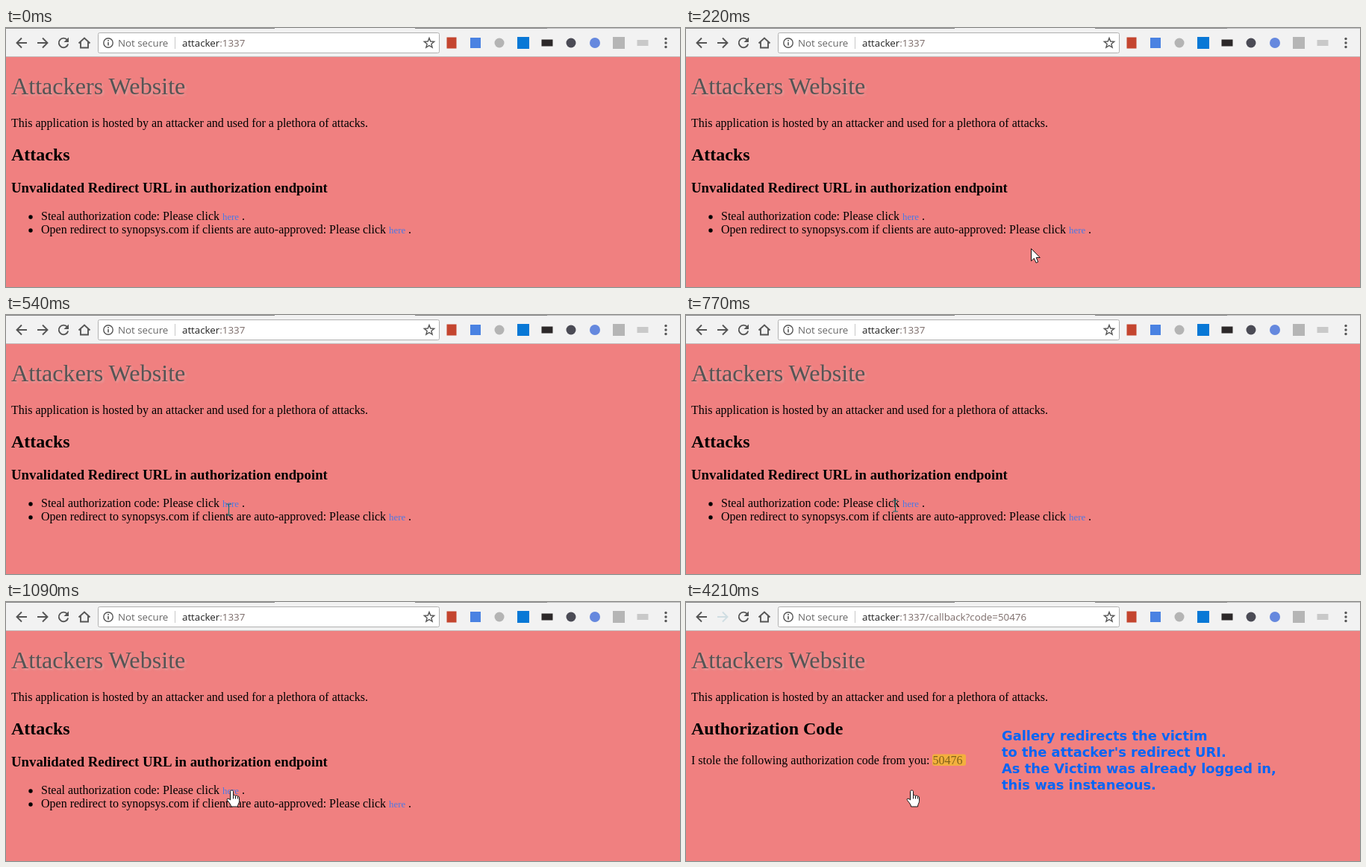
An HTML page for the animation above (5870 ms loop, 903 by 348 pixels).

```html
<!DOCTYPE html>
<html lang="en">
<head>
<meta charset="utf-8">
<title>Redirect demo</title>
<style>
  html, body { margin: 0; width: 100%; height: 100%; overflow: hidden; }
  svg { display: block; width: 903px; height: 348px; }
  .page { font: 16px "Liberation Serif", "Times New Roman", serif; fill: #000; }
  .title { font-size: 32.15px; fill: #555; filter: drop-shadow(2px 2px 1.5px rgba(215, 190, 190, .5)); }
  .h2 { font-size: 24px; font-weight: bold; }
  .h3 { font-size: 18.79px; font-weight: bold; }
  .link { font-size: 12.8px; fill: #4a78e6; }
  .ui { font: 13.34px "Open Sans", "Noto Sans", sans-serif; }
  .status { font-size: 11.5px; fill: #4c4c4c; }
  .note { font: bold 17.86px "DejaVu Sans", Verdana, sans-serif; fill: #0565f5; }
  .icon { fill: none; stroke: #555; stroke-width: 1.9; }
  .marker { fill: #fae02a; opacity: .6; }
</style>
</head>
<body>
<svg viewBox="0 0 903 348">
  <rect width="903" height="348" fill="#f08080"/>

  <g id="toolbar">
    <rect width="903" height="38" fill="#f2f2f2"/>
    <rect y="38" width="903" height="1" fill="#c4bcbc"/>
    <path d="M0 .5H360M548 .5H725" stroke="#888"/>
    <path d="M725 .5H903" stroke="#bbb"/>
    <rect x="123.5" y="6.5" width="457" height="27" rx="2" fill="#fff" stroke="#b0b0b0"/>
    <path class="icon" d="M28 20H15M21 13.5L14.5 20L21 26.5"/>
    <path id="forward" class="icon" d="M42 20H55M49 13.5L55.5 20L49 26.5"/>
    <path class="icon" d="M82 16A6.3 6.3 0 1 0 83.2 21.5"/>
    <path d="M84 12.5V19H77.5Z" fill="#555"/>
    <path class="icon" d="M97.5 20.5L105 13.5L112.5 20.5M100 19V26.5H110V19"/>
    <circle class="icon" cx="137" cy="20" r="6.2" style="stroke-width:1.4"/>
    <path d="M137 16V17.7M137 19V23.5" stroke="#555" stroke-width="1.6"/>
    <path d="M226.5 12V28" stroke="#c8c8c8"/>
    <path id="star" class="icon" style="stroke-width:1.4"/>
    <g fill="#555"><circle cx="884" cy="14.5" r="1.7"/><circle cx="884" cy="20" r="1.7"/><circle cx="884" cy="25.5" r="1.7"/></g>
    <g id="extensions"></g>
    <g class="ui">
      <text x="150" y="25" fill="#666">Not secure</text>
      <text x="236" y="25" fill="#222">attacker<tspan id="path" fill="#7c6c6a"></tspan></text>
    </g>
  </g>

  <g class="page">
    <text class="title" x="7" y="89">Attackers Website</text>
    <text x="7" y="133">This application is hosted by an attacker and used for a plethora of attacks.</text>
    <g id="attacks">
      <text class="h2" x="7" y="178">Attacks</text>
      <text class="h3" x="7" y="221">Unvalidated Redirect URL in authorization endpoint</text>
      <circle cx="33" cy="254" r="2.7"/>
      <circle cx="33" cy="272" r="2.7"/>
      <text x="47" y="258">Steal authorization code: Please click <tspan class="link">here</tspan> .</text>
      <text x="47" y="276">Open redirect to synopsys.com if clients are auto-approved: Please click <tspan class="link">here</tspan> .</text>
    </g>
    <g id="stolen">
      <text class="h2" x="7" y="178">Authorization Code</text>
      <rect x="330" y="204.5" width="45" height="15.5" rx="3" fill="#f3b03e"/>
      <text x="7" y="218">I stole the following authorization code from you: <tspan fill="#80601a">50476</tspan></text>
    </g>
  </g>

  <g id="hover">
    <path d="M0 328.5H789Q792.5 328.5 792.5 332V348H0Z" fill="#eee7e7" stroke="#c0a6a6"/>
    <text class="ui status" x="2" y="343">gallery:3005/oauth/authorize?response_type=code&amp;redirect_uri=http%3A%2F%2Fattacker%3A1337%2Fcallback&amp;scope=email&amp;client_id=photoprint</text>
    <path class="marker" d="M285 331Q287 327 300 327L345 325Q380 323 418 325L420 328H590Q600 329 600 335V341Q598 345 588 344L440 343L410 346L330 345L294 346Q285 345 285 339Z"/>
  </g>
  <g id="linkNote" class="note"></g>
  <g id="codeNote" class="note"></g>

  <g id="cursor">
    <path id="arrow" d="M0 0V16.5L3.9 13L6.5 19L9.2 17.8L6.7 12H11.8Z" fill="#fff" stroke="#111"/>
    <path id="beam" d="M-3.5 -7.5H-1Q0 -7.5 0 -6.5Q0 -7.5 1 -7.5H3.5M0 -6.5V6.5M-3.5 7.5H-1Q0 7.5 0 6.5Q0 7.5 1 7.5H3.5" fill="none" stroke="#0f6f6f" stroke-width="1.1"/>
    <g id="hand" stroke="#111" stroke-linejoin="round">
      <path d="M-2 2C-2 0 2 0 2 2V8C2 6.7 5 6.9 5 8.2C5.2 7.2 8 7.3 8 9C8.4 8.2 10 8.6 10 10.5V15C10 18 8 19 8 22.5H-1C-1 20 -3.5 17 -6 14C-7.5 11.5 -4.5 10.5 -2 13.5Z" fill="#fff"/>
      <path d="M2 8V12M5 8.2V12M8 9V12"/>
    </g>
  </g>
</svg>
<script>
const LOOP = 5870, HOVER = 1240, STOLEN = 4210;
const $ = id => document.getElementById(id);
const show = (id, on) => $(id).setAttribute("visibility", on ? "inherit" : "hidden");

function add(parent, tag, attrs, text = "") {
  const node = document.createElementNS("http://www.w3.org/2000/svg", tag);
  for (const key in attrs) node.setAttribute(key, attrs[key]);
  node.textContent = text;
  parent.append(node);
}

const addNote = (id, x, y, lines) =>
  lines.forEach((line, i) => add($(id), "text", { x, y: y + 22 * i }, line));

addNote("linkNote", 567, 231, [
  "Attacker provides a link with", "custom redirect URI.",
  "The other parameters are still", "the same."
]);
addNote("codeNote", 423, 186, [
  "Gallery redirects the victim", "to the attacker's redirect URI.",
  "As the Victim was already logged in,", "this was instaneous."
]);

const starPoint = (_, i) => {
  const angle = i * Math.PI / 5, r = i % 2 ? 3 : 7;
  return [567 + r * Math.sin(angle), 20.5 - r * Math.cos(angle)];
};
$("star").setAttribute("d", "M" + Array.from({ length: 10 }, starPoint).join("L") + "Z");

// Toolbar buttons: colour, width, height (no height means a circle)
[
  ["#c4452f", 13, 15], ["#4a82e2", 14, 14], ["#b4b4b4", 13], ["#0878d6", 16, 16],
  ["#2c2829", 15, 9], ["#4b4b55", 13], ["#6588de", 14], ["#b5b5b5", 16, 16], ["#c9c9c9", 15, 8]
].forEach(([fill, width, height], i) => {
  const cx = 597 + 32 * i, cy = 20;
  if (height) add($("extensions"), "rect", { x: cx - width / 2, y: cy - height / 2, width, height, fill });
  else add($("extensions"), "circle", { cx, cy, r: width / 2, fill });
});

// Pointer stops: time, shape, x, y
const stops = [
  [70, "arrow", 707, 332], [150, "arrow", 580, 313], [220, "arrow", 462.5, 296.5],
  [310, "arrow", 408, 284], [390, "beam", 365.5, 273.5], [460, "beam", 328.5, 266.5],
  [540, "beam", 298.5, 261.5], [630, "beam", 280.5, 258.5], [710, "beam", 279.5, 257.5],
  [770, "beam", 280.5, 256.5], [860, "beam", 284.5, 255.5], [930, "hand", 292, 253.5],
  [1020, "hand", 299, 253], [1090, "hand", 302.5, 252.5]
];

function render(t) {
  const stolen = t >= STOLEN, hover = t >= HOVER && !stolen;
  show("attacks", !stolen);
  show("stolen", stolen);
  show("codeNote", stolen);
  show("hover", hover);
  show("linkNote", hover);
  $("path").textContent = ":1337" + (stolen ? "/callback?code=50476" : "");
  $("forward").style.stroke = stolen ? "#cfdde2" : "";

  const stop = stops.findLast(([start]) => start <= t);
  show("cursor", stop);
  if (!stop) return;
  const [, shape, x, y] = stop;
  $("cursor").setAttribute("transform", `translate(${x} ${y})`);
  for (const id of ["arrow", "beam", "hand"]) $(id).setAttribute("display", id === shape ? "inline" : "none");
}

function tick() {
  render(performance.now() % LOOP);
  requestAnimationFrame(tick);
}
tick();
</script>
</body>
</html>
```
